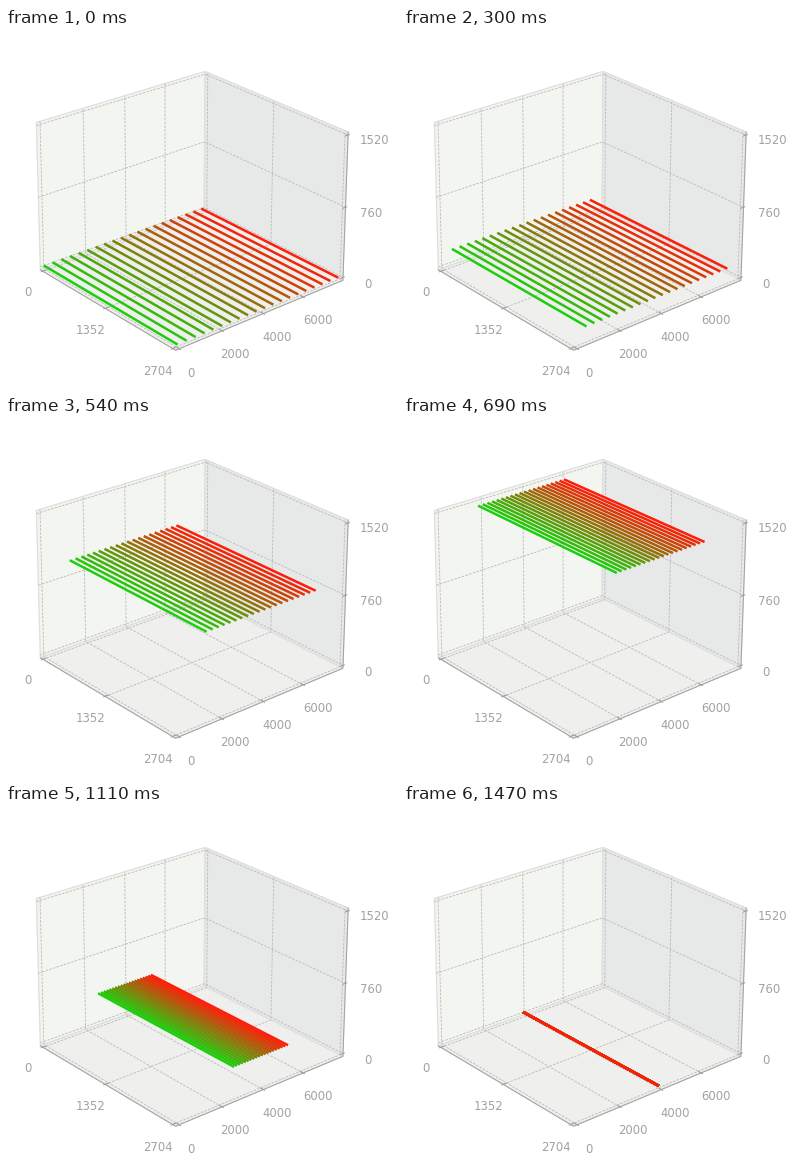
A matplotlib script that plays this animation: 392 by 360 pixels, repeating every 1500 ms.

```python
import numpy as np
import matplotlib.pyplot as plt
from matplotlib.animation import FuncAnimation

W, H, DPI = 392, 360, 100
PX = 72 / DPI
FRAMES, INTERVAL = 50, 30
X_MAX, Y_MAX, Z_MAX = 2704, 7900, 1520
LINES = 20
LO, HI = -1 / 48, 49 / 48      # panes reach slightly past the data limits

# Box corners in unit coordinates and where they sit on the stage.
CORNERS = {
    (LO, LO, LO): (33.5, 241), (HI, LO, LO): (169.5, 321.7),
    (HI, HI, LO): (336, 252.3), (LO, HI, LO): (198, 181.7),
    (LO, LO, HI): (29.8, 94.3), (LO, HI, HI): (198.7, 43),
    (HI, HI, HI): (341.7, 103),
}


def fit_camera(pairs):
    """Least-squares 3x4 projection from matching points."""
    rows, rhs = [], []
    for p, (u, v) in pairs.items():
        p = np.array(p)
        rows.append([*p, 1, 0, 0, 0, 0, *(-u * p)])
        rows.append([0, 0, 0, 0, *p, 1, *(-v * p)])
        rhs += [u, v]
    m = np.linalg.lstsq(np.array(rows, float), np.array(rhs, float), rcond=None)[0]
    return np.append(m, 1).reshape(3, 4)


CAMERA = fit_camera(CORNERS)


def project(points):
    pts = np.atleast_2d(np.array(points, float))
    u, v, w = CAMERA @ np.c_[pts, np.ones(len(pts))].T
    return u / w, v / w


fig = plt.figure(figsize=(W / DPI, H / DPI), dpi=DPI, facecolor="white")
ax = fig.add_axes([0, 0, 1, 1])
ax.set_xlim(-0.5, W - 0.5)
ax.set_ylim(H - 0.5, -0.5)
ax.axis("off")


def path(points, color, width, **kw):
    return ax.plot(*project(points), color=color, lw=width * PX, **kw)[0]


def pane(points, color):
    ax.fill(*project(points), facecolor=color, edgecolor="#dededc",
            lw=1.2 * PX, zorder=1)


def grid(*points):
    path(points, "#bababa", 0.85, zorder=2, dashes=(3, 1.5),
         dash_capstyle="butt")


def tick(start, end):
    path([start, end], "#969692", 1, zorder=3)


def label(x, y, text):
    ax.text(x, y, text, ha="center", va="baseline", color="#a3a29d",
            fontsize=11.6 * PX, family="DejaVu Sans", zorder=3)


pane([(LO, LO, LO), (LO, HI, LO), (LO, HI, HI), (LO, LO, HI)], "#f3f5f0")
pane([(LO, HI, LO), (HI, HI, LO), (HI, HI, HI), (LO, HI, HI)], "#e7e9e9")
pane([(LO, LO, LO), (HI, LO, LO), (HI, HI, LO), (LO, HI, LO)], "#eff0ee")

OUT, IN = 1 / 120, 1 / 60
for a in (0, 0.5, 1):
    grid((a, LO, LO), (a, HI, LO), (a, HI, HI))
    grid((LO, LO, a), (LO, HI, a), (HI, HI, a))
    tick((a, LO - OUT, LO), (a, LO + IN, LO))
    tick((HI, HI - IN, a), (HI, HI + OUT, a))
for value in range(0, Y_MAX, 2000):
    b = value / Y_MAX
    grid((HI, b, LO), (LO, b, LO), (LO, b, HI))
    tick((HI + OUT, b, LO), (HI - IN, b, LO))

path([(LO, LO, LO), (HI, LO, LO), (HI, HI, LO), (HI, HI, HI)],
     "#a2a29f", 1, zorder=3)

for x, y, value in [(21.5, 267.7, 0), (83.7, 305.3, X_MAX // 2),
                    (151.2, 346.4, X_MAX), (184.2, 348.2, 0),
                    (228.2, 329.8, 2000), (270.4, 312.7, 4000),
                    (311.2, 295.8, 6000), (361.2, 259.7, 0),
                    (364.2, 188.7, Z_MAX // 2), (368.2, 115.7, Z_MAX)]:
    label(x, y, str(value))

GREEN = np.array([28, 206, 12]) / 255
RED = np.array([255, 28, 8]) / 255
STRAND_X = LO, 1.01
strands = [
    path([(x, 0, 0) for x in STRAND_X], GREEN + (RED - GREEN) * s, 2.5,
         zorder=5, solid_capstyle="butt")
    for s in np.linspace(0, 1, LINES)
]


def smooth(n, start, end):
    t = np.clip((n - start) / (end - start), 0, 1)
    return t * t * (3 - 2 * t)


def spread(n):
    """Squeeze to a third, then close up completely."""
    return 1 - 2 / 3 * smooth(n, 0, 36) - 1 / 3 * smooth(n, 37, 49)


def height(n):
    return np.exp(-((n - 24.9) / 9.7) ** 2)


def update(n):
    width, z = spread(n), height(n)
    for i, strand in enumerate(strands):
        y = 0.5 + width * (i / (LINES - 1) - 0.5)
        strand.set_data(*project([(x, y, z) for x in STRAND_X]))
    return strands


anim = FuncAnimation(fig, update, frames=FRAMES, interval=INTERVAL,
                     repeat=True, repeat_delay=0, blit=False)
plt.show()
```
